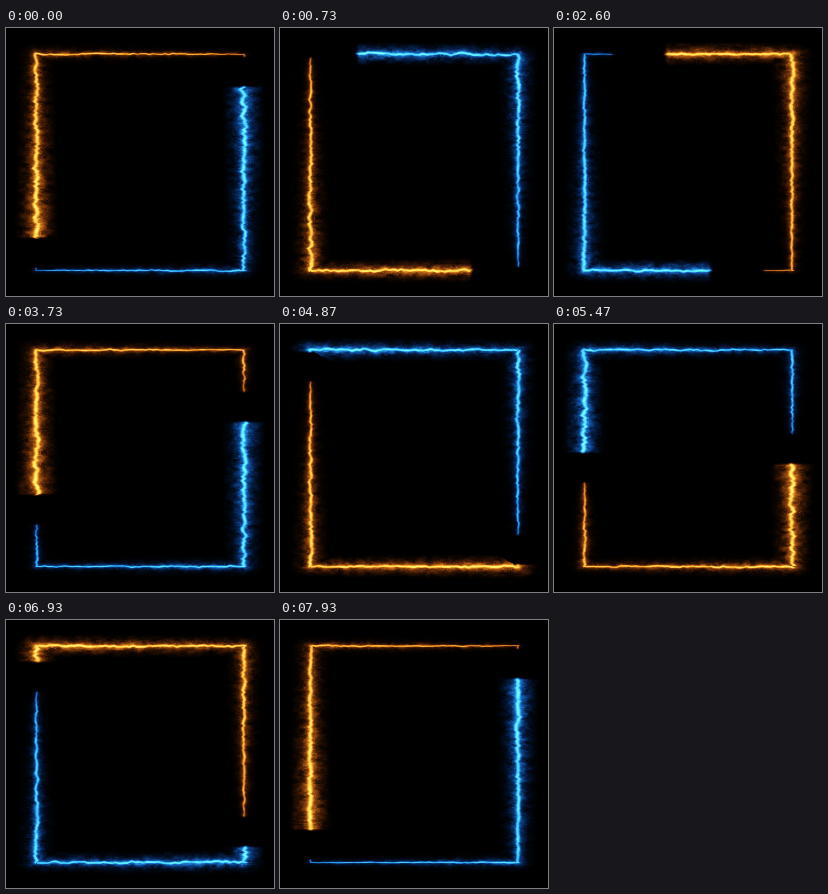
These frames come from a looping animation (268 px wide and 268 px high, 7.99 s). An HTML page with a canvas:

```html
<!DOCTYPE html>
<html lang="en">
<head>
<meta charset="utf-8">
<title>Electric frame</title>
<style>
html, body { margin: 0; width: 100%; height: 100%; overflow: hidden; background: #000; }
canvas { display: block; width: 100vw; height: 100vh; }
</style>
</head>
<body>
<canvas id="stage" width="268" height="268"></canvas>
<script>
const SIZE = 268, LOOP = 7990, STEPS = 120, STEP_MS = 1000 / 15;
const SQUEEZE = 9 / 16;            // the glow is computed in a narrow space, then stretched sideways
const REACH = 13;
const ctx = document.getElementById('stage').getContext('2d');
const image = ctx.createImageData(SIZE, SIZE);
const px = image.data;

// Counter-clockwise frame, starting at the top right corner
const L = 30.5 * SQUEEZE, R = 238 * SQUEEZE, T = 26, B = 242.5;
const W = R - L, H = B - T, HALF = W + H;
const BEAM = HALF * 0.9, GAP = HALF - BEAM;
const HEAD_START = W + 182;
const sides = [
  { x: R, y: T, dx: -1, dy: 0, len: W, at: 0 },
  { x: L, y: T, dx: 0, dy: 1, len: H, at: W },
  { x: L, y: B, dx: 1, dy: 0, len: W, at: HALF },
  { x: R, y: B, dx: 0, dy: -1, len: H, at: HALF + W }
];
const tints = [[1.6, 0.62, 0.12], [0.13, 0.68, 1.7]];

function hash(x, y) {
  let h = Math.imul(x, 374761393) + Math.imul(y, 668265263) | 0;
  h = Math.imul(h ^ (h >>> 13), 1274126177);
  return ((h ^ (h >>> 16)) >>> 0) / 4294967296;
}

function noise(x, y) {
  const i = Math.floor(x), j = Math.floor(y);
  let u = x - i, v = y - j;
  u *= u * (3 - 2 * u);
  v *= v * (3 - 2 * v);
  const a = hash(i, j), b = hash(i + 1, j), c = hash(i, j + 1), d = hash(i + 1, j + 1);
  return a + (b - a) * u + (c - a) * v + (a - b - c + d) * u * v;
}

const fbm = (x, y) => noise(x, y) * 0.55 + noise(x * 2.1 + 40, y * 2.1) * 0.3 + noise(x * 4.3, y * 4.3 + 70) * 0.15;

function locate(x, y) {
  let best = { dist: Infinity };
  for (const side of sides) {
    const ex = x - side.x, ey = y - side.y;
    const along = Math.min(side.len, Math.max(0, ex * side.dx + ey * side.dy));
    const dist = Math.hypot(ex - side.dx * along, ey - side.dy * along);
    if (dist < best.dist) {
      const sign = ex * side.dy - ey * side.dx < 0 ? -1 : 1;
      best = { dist, d: dist * sign, s: side.at + along, x, y };
    }
  }
  return best;
}

// Only pixels close to the frame can light up
const cells = [];
for (let j = 0; j < SIZE; j++) {
  for (let i = 0; i < SIZE; i++) {
    const cell = locate((i + 0.5) * SQUEEZE, j + 0.5);
    if (cell.dist < REACH) cells.push({ ...cell, at: (j * SIZE + i) * 4 });
  }
}

function glow(cell, along, n) {
  const p = Math.min(1, Math.max(0, 1 - along / BEAM));
  const past = Math.max(0, -along, along - BEAM);
  const cap = Math.exp(-past * past / 2.5);
  if (cap < 0.01) return 0;
  const power = 0.35 + 0.65 * p;
  const flow = n * 0.45;
  const wave = noise(cell.s * 0.16, flow) + 0.7 * noise(cell.s * 0.45, flow + 90) - 0.85;
  const d = Math.abs(cell.d + wave * 2.3 * power);
  const flick = 0.55 + 0.9 * noise(cell.s * 0.3, flow + 300);

  const core = 3.2 * power * flick * Math.exp(-d * d / (0.25 + 0.65 * p));
  const halo = 0.85 * power * Math.exp(-d / (0.8 + 1.1 * p));
  const cloud = fbm(cell.x * 0.24, cell.y * 0.24 - flow * 1.3 + 500);
  const haze = 1.9 * power * cloud * cloud * Math.exp(-cell.dist / (1.3 + 2.5 * p));
  const ridge = Math.abs(fbm(cell.x * 0.33 + 200, cell.y * 0.33 + flow) - 0.5);
  const sparks = 0.9 * p * Math.exp(-ridge * 28 - cell.dist / 2.6);
  const edge = Math.min(1, (REACH - cell.dist) / 4);
  return (core + halo + haze + sparks) * cap * edge * Math.min(1, 0.55 + p * 6);
}

function draw(n) {
  const head = HEAD_START + n / (STEPS - 1) * 4 * HALF;
  for (const cell of cells) {
    const behind = head - cell.s + GAP / 2;
    const turn = Math.floor(behind / HALF);
    const light = glow(cell, behind - turn * HALF - GAP / 2, n);
    const tint = tints[turn & 1];
    for (let c = 0; c < 3; c++) px[cell.at + c] = 255 * (1 - Math.exp(-light * tint[c]));
  }
  ctx.putImageData(image, 0, 0);
}

for (let i = 3; i < px.length; i += 4) px[i] = 255;

let shown = -1;
const start = performance.now();
function tick() {
  const t = (performance.now() - start) % LOOP;
  const n = Math.min(STEPS - 1, Math.floor((t + 4) / STEP_MS));
  if (n !== shown) draw(shown = n);
  requestAnimationFrame(tick);
}
tick();
</script>
</body>
</html>
```
